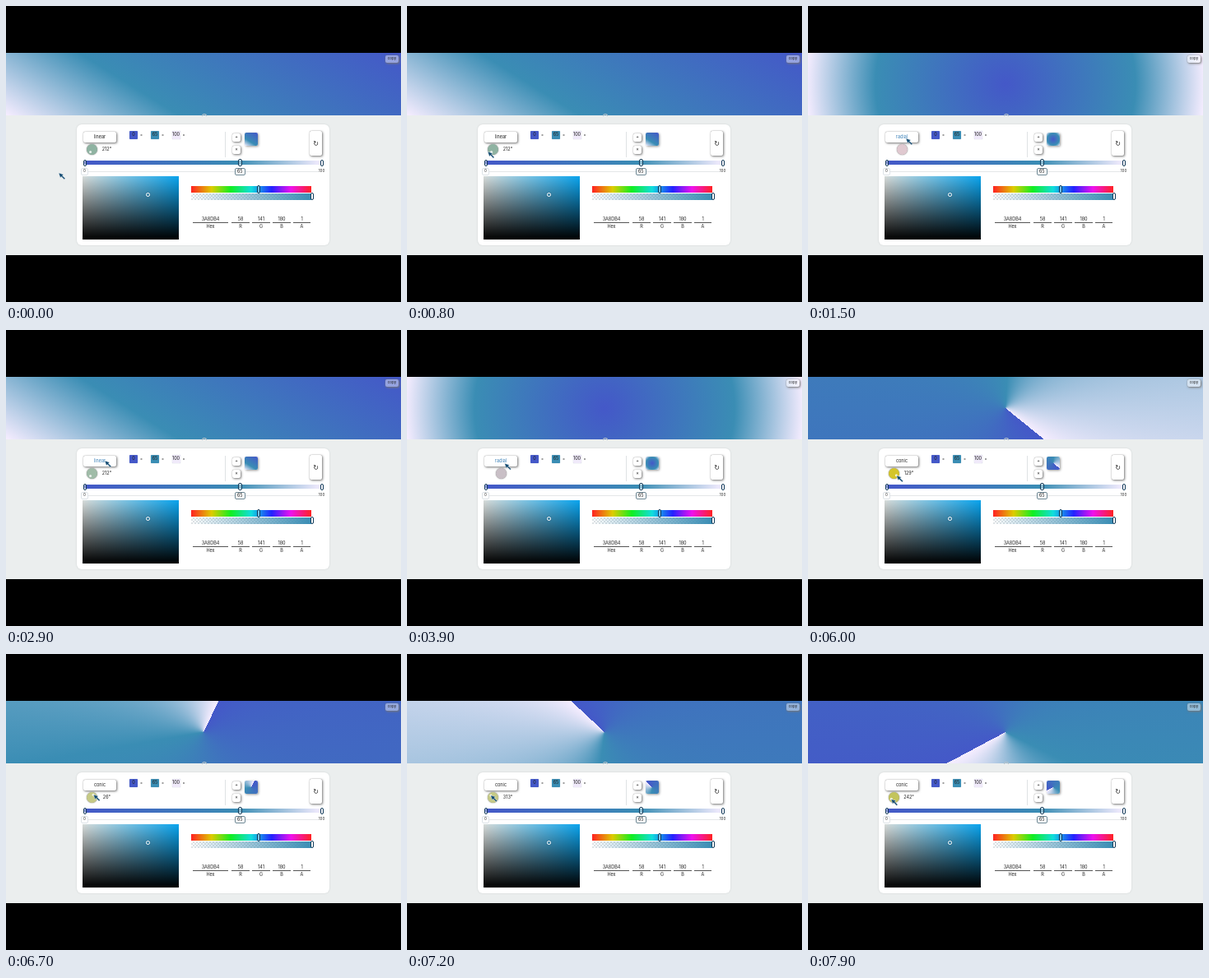
Write an HTML page that moves like this. It is 480x360 px and loops after 8 s.

```html
<!DOCTYPE html>
<html lang="en">
<head>
<meta charset="utf-8">
<title>Gradient editor</title>
<style>
  html, body { margin: 0; width: 100%; height: 100%; overflow: hidden; background: #000; }
  #stage { position: relative; width: 480px; height: 360px; overflow: hidden; background: #000;
    font: 5.5px Inter, "Open Sans", sans-serif; color: #222; }
  #stage > * { position: absolute; box-sizing: border-box; }
  .box { display: flex; align-items: center; justify-content: center; white-space: nowrap; line-height: 1; }
  .button { background: #fff; border-radius: 2px; box-shadow: 0 0 1px #777, 1px 1px 3px #777; }
  .chip { border-radius: 1px; }
  .handle { border: 1px solid #123a58; border-radius: 2px; background: #fff6; }
  .line { background: #555; }
  .small { font-size: 4.5px; }
  #save { background: #ffffff70; }
</style>
</head>
<body>
<div id="stage"></div>
<script>
const LOOP = 8000, STEP = 100;
const STOPS = '#4458c8 0%, #3a8db4 65%, #f6edff 100%';
const DIAL = { x: 104.5, y: 174.5, reach: 4 };
const stage = document.getElementById('stage');

function box(x, y, w, h, { text = '', cls = '', id = '', css = '' } = {}) {
  const el = document.createElement('div');
  el.className = 'box ' + cls;
  el.id = id;
  el.style.cssText = `left:${x}px;top:${y}px;width:${w}px;height:${h}px;${css}`;
  el.textContent = text;
  return stage.appendChild(el);
}
const label = (x, y, text, cls = '') => box(x - 20, y - 4, 40, 8, { text, cls });
const button = (x, y, w, h, text, id = '') => box(x, y, w, h, { text, cls: 'button', id });
const handle = (x, y, h, css = '') => box(x - 2, y, 4, h, { cls: 'handle', css });

// Preview banner and panel
box(0, 57, 480, 246, { css: 'background:#ebeeee' });
const banner = box(0, 57, 480, 76);
box(238, 131, 6, 3, { css: 'border:.7px solid #b5c3cc;border-radius:3px 3px 0 0;border-bottom:0' });
button(461, 60, 16, 9, 'copy', 'save').classList.add('small');
box(86, 144, 307, 147, { css: 'background:#fff;border-radius:6px;box-shadow:0 0 2px #c9cdcd' });

// Toolbar
const modeButton = button(94, 153, 40, 13, '');
const dial = box(0, 168, 13, 13, { css: 'border-radius:50%;box-shadow:0 0 1.5px #666' });
const dot = box(0, 0, 3, 3, { css: 'border-radius:50%;background:#fffc' });
const angleText = label(122.5, 175, '');
[[150, '#4458c8', '0'], [176, '#3a8db4', '65'], [201.5, '#f0eafa', '100']].forEach(([x, color, text]) => {
  box(x, 152, 10, 10, { text, cls: 'chip', css: `background:${color};box-shadow:0 0 1px #9ab` });
  label(x + 14.5, 157, '×', 'small');
});
box(266, 153, 1, 31, { css: 'background:#dfe2e4' });
button(275, 154.5, 10, 10, '+');
button(275, 170, 10, 10, '×');
const swatch = box(290, 154, 16, 16, { css: 'border-radius:2px;box-shadow:1px 1px 3px #999' });
const rotate = button(369, 152, 15, 30, '↻');
rotate.style.font = '8px "DejaVu Sans", sans-serif';

// Gradient stops
box(95, 188, 289, 5, { css: `background:linear-gradient(90deg, ${STOPS});border-radius:2px` });
handle(95.5, 186.5, 8);
handle(284, 186, 9, 'border-width:1.4px;width:5px');
handle(383.5, 186.5, 8);
box(100, 201, 280, 1, { css: 'background:#e4e6e8' });
box(91, 197, 9, 9, { text: '0', css: 'border:.7px solid #dde3e8;border-radius:2px;background:#fff' }).classList.add('small');
box(278, 197, 12.5, 9, { text: '65', css: 'border:1px solid #6d8794;border-radius:2px;background:#fff' });
label(383.5, 201.5, '100', 'small');

// Colour picker
box(93, 207, 117, 77, { css:
  'background:linear-gradient(#0000, #000), linear-gradient(90deg, #d8dcda, #0aa4ee)' });
box(170, 227, 4.5, 4.5, { css: 'border:.9px solid #fff;border-radius:50%;box-shadow:0 0 1px #035' });
box(225, 219, 146, 8, { css:
  'background:linear-gradient(90deg, #f22, #dc0 17%, #1e2 33%, #1dd 50%, #22f 67%, #e1e 83%, #f22)' });
box(225, 228, 146, 7.5, { css:
  'background:linear-gradient(90deg, #3a8db400, #3a8db4), repeating-conic-gradient(#dfe3e5 0 25%, #fff 0 50%) 0 0/4px 4px' });
handle(306.5, 218, 9.5);
handle(371.5, 226.5, 9.5);

[[227, 43, '3A8DB4', 'Hex'], [274, 22, '58', 'R'], [299, 22, '141', 'G'],
 [324, 22, '180', 'B'], [349, 21, '1', 'A']].forEach(([x, w, value, name]) => {
  label(x + w / 2, 259.8, value);
  box(x, 263, w, .8, { cls: 'line' });
  label(x + w / 2, 268.5, name);
});

stage.insertAdjacentHTML('beforeend', `
  <svg id="cursor" width="10" height="10" viewBox="-1 -1 10 10" style="left:-1px;top:-1px">
    <path d="M0 0 6 2 4.4 3.2 8 6.8 6.8 8 3.2 4.4 2 6Z" fill="#134b72" stroke="#fff" stroke-width=".4"/>
  </svg>`);
const cursor = document.getElementById('cursor');

// Timetables: [ms, ...values]
const MODES = [[0, 'linear'], [1200, 'radial'], [2100, 'conic'], [2700, 'linear'], [3600, 'radial'], [5250, 'conic']];
const DIAL_COLORS = [[0, '#8fb3a2'], [1200, '#e0c9d0'], [2100, '#c8c880'], [2700, '#a0bca8'],
  [3600, '#c9bfc6'], [5250, '#d4c52a'], [6500, '#c6ca86'], [7500, '#c3c45c']];
const ANGLES = [[0, 212], [5500, 212], [6000, 129], [7200, -47], [7900, -118], [8000, -128]];
const MOVES = [[0, 64, 203], [400, 66, 202], [1100, 119, 161], [1500, 119, 161], [2900, 120, 159],
  [3700, 120, 160], [4500, 111, 174], [4900, 110.5, 174.5], [5200, 119, 161], [5300, 119, 161], [5500, 102.4, 177.9]];

const held = (table, t) => table.filter(row => row[0] <= t).pop()[1];

function tween(table, t, ease = k => k) {
  const next = table.findIndex(row => row[0] > t);
  if (next < 0) return table[table.length - 1].slice(1);
  const a = table[next - 1], b = table[next];
  const k = ease((t - a[0]) / (b[0] - a[0]));
  return a.slice(1).map((v, i) => v + (b[i + 1] - v) * k);
}
const smooth = k => k * k * (3 - 2 * k);

function aroundDial(angle, radius) {
  const rad = angle * Math.PI / 180;
  return [DIAL.x + radius * Math.sin(rad), DIAL.y - radius * Math.cos(rad)];
}

function draw(t) {
  const mode = held(MODES, t);
  const [rawAngle] = tween(ANGLES, t);
  const angle = (Math.round(rawAngle) + 360) % 360;
  const [x, y] = t >= 5500 ? aroundDial(rawAngle, DIAL.reach) : tween(MOVES, t, smooth);
  const radial = mode === 'radial';

  const gradient = {
    linear: `linear-gradient(${angle}deg, ${STOPS})`,
    radial: `radial-gradient(circle, ${STOPS})`,
    conic: `conic-gradient(from ${angle}deg, ${STOPS})`
  }[mode];
  banner.style.background = swatch.style.background = gradient;

  const hover = x > 94 && x < 134 && y > 153 && y < 166;
  modeButton.textContent = mode;
  modeButton.style.color = hover ? '#3d82b8' : '#222';

  dial.style.left = (radial ? 107.5 : 98) + 'px';
  dial.style.background = held(DIAL_COLORS, t);
  const [dx, dy] = aroundDial(angle, 3.6);
  dot.style.transform = `translate(${dx - 1.5}px, ${dy - 1.5}px)`;
  dot.style.visibility = angleText.style.visibility = radial ? 'hidden' : 'visible';
  angleText.textContent = angle + '°';

  cursor.style.transform = `translate(${x}px, ${y}px)`;
}

const start = performance.now();
function tick() {
  const t = (performance.now() - start) % LOOP;
  draw(Math.floor(t / STEP) * STEP);
  requestAnimationFrame(tick);
}
tick();
</script>
</body>
</html>
```
